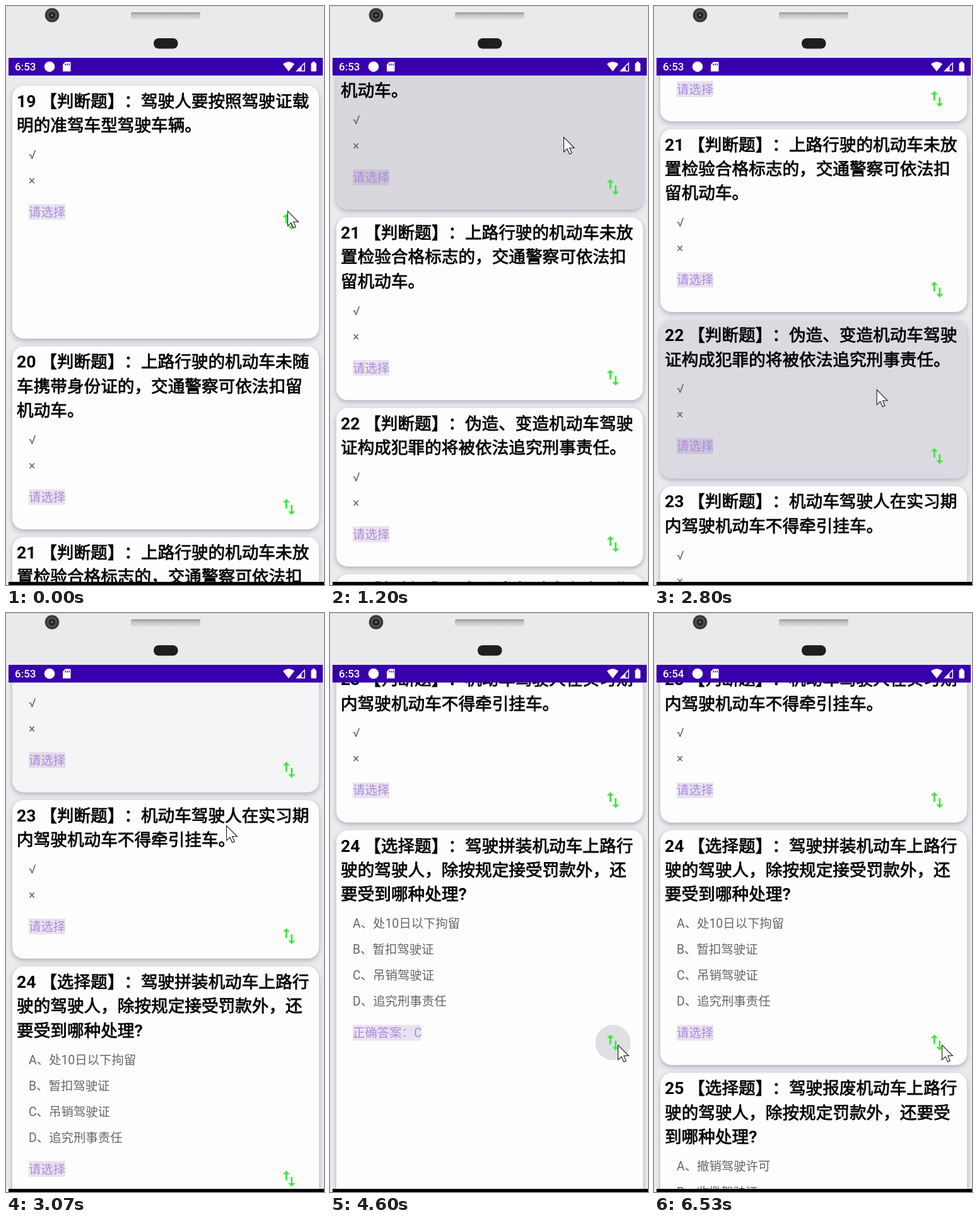
Write an HTML page with a canvas that moves like this. It is 504 px wide and 916 px high and loops after 8000 ms.

```html
<!DOCTYPE html>
<html lang="zh-CN">
<head>
<meta charset="utf-8">
<title>驾驶题库</title>
<style>
html, body { margin: 0; width: 100%; height: 100%; overflow: hidden; background: #e8eaec; }
canvas { display: block; width: 504px; height: 916px; }
</style>
</head>
<body>
<canvas id="stage"></canvas>
<script>
const W = 504, H = 916, LOOP = 8000, FPS = 15;
const BAR = 82, TOP = 110, FLOOR = 911;
const CJK = '"Noto Sans CJK SC", "Noto Sans CJK", sans-serif';
const LATIN = 'Roboto, sans-serif';
const TITLE = 26.63, BODY = 19.4;
const SHELL = '#e8eaec', PURPLE = '#3700ac';

const canvas = document.getElementById('stage');
const ctx = canvas.getContext('2d');
const dpr = window.devicePixelRatio || 1;
canvas.width = W * dpr;
canvas.height = H * dpr;

const yesNo = ['√', '×'];
const cards = [
  { title: ['19 【判断题】：驾驶人要按照驾驶证载', '明的准驾车型驾驶车辆。'], options: yesNo },
  { title: ['20 【判断题】：上路行驶的机动车未随', '车携带身份证的，交通警察可依法扣留', '机动车。'], options: yesNo },
  { title: ['21 【判断题】：上路行驶的机动车未放', '置检验合格标志的，交通警察可依法扣', '留机动车。'], options: yesNo },
  { title: ['22 【判断题】：伪造、变造机动车驾驶', '证构成犯罪的将被依法追究刑事责任。'], options: yesNo },
  { title: ['23 【判断题】：机动车驾驶人在实习期', '内驾驶机动车不得牵引挂车。'], options: yesNo },
  { title: ['24 【选择题】：驾驶拼装机动车上路行', '驶的驾驶人，除按规定接受罚款外，还', '要受到哪种处理?'],
    options: ['A、处10日以下拘留', 'B、暂扣驾驶证', 'C、吊销驾驶证', 'D、追究刑事责任'] },
  { title: ['25 【选择题】：驾驶报废机动车上路行', '驶的驾驶人，除按规定罚款外，还要受', '到哪种处理?'],
    options: ['A、撤销驾驶许可', 'B、收缴驾驶证'] }
];

const clamp = p => Math.min(1, Math.max(0, p));
const span = (t, a, b) => clamp((t - a) / (b - a));
const linear = p => p;
const smooth = p => p * p * (3 - 2 * p);
const rush = p => p * p;
const out = p => 1 - (1 - p) * (1 - p);

// Each key is [time, values, easing towards this key].
function track(keys, t) {
  let i = 0;
  while (i < keys.length - 1 && t >= keys[i + 1][0]) i++;
  const [t0, a] = keys[i];
  if (i === keys.length - 1) return a;
  const [t1, b, ease = linear] = keys[i + 1];
  const p = ease(span(t, t0, t1));
  return a.map((v, k) => v + (b[k] - v) * p);
}

const pointer = [
  [0, [446, 324]], [260, [446, 324]], [530, [385, 566], smooth],
  [900, [385, 566]], [1170, [370, 207], smooth],
  [2080, [370, 207]], [2133, [379, 532]], [2200, [381, 625]], [2330, [354, 705], out],
  [2640, [354, 705]], [2950, [349, 336], rush],
  [3590, [349, 336]], [4130, [456, 683], smooth]
];
const pressA = [[900, [0]], [1060, [0.7]], [1200, [0.9]], [1500, [0]]];
const pressB = [[2640, [0]], [2800, [0.8]], [2930, [0.8]], [3067, [0.22]], [3200, [0]]];

function scrollAt(t) {
  const flingA = s => 411.5 - 55 * Math.exp((1200 - s) / 90);
  const flingB = s => 1175 - 215 * Math.exp((3067 - s) / 160);
  if (t < 900) return 0;
  if (t < 1170) return flingA(1170) * smooth(span(t, 900, 1170));
  if (t < 1530) return flingA(t);
  if (t < 2640) return 411.5;
  if (t < 2950) return 411.5 + (flingB(2950) - 411.5) * rush(span(t, 2640, 2950));
  return t < 4130 ? flingB(t) : 1175;
}

function extraAt(i, t) {
  if (i === 0) return 149.5 * (1 - smooth(span(t, 50, 430)));
  if (i === 5) return 220 * (out(span(t, 4440, 4630)) - smooth(span(t, 6080, 6460)));
  return 0;
}

function pressAt(i, t) {
  return i === 1 ? track(pressA, t)[0] : i === 3 ? track(pressB, t)[0] : 0;
}

function rippleAt(t) {
  for (const start of [4440, 5770]) {
    if (t > start && t < start + 500) {
      return { r: 28 * out(span(t, start, start + 140)), a: 1 - span(t, start + 190, start + 500) };
    }
  }
  return null;
}

function box(x, y, w, h, r, fill) {
  ctx.fillStyle = fill;
  ctx.beginPath();
  ctx.roundRect(x, y, w, h, r);
  ctx.fill();
}

function disc(x, y, r, fill) {
  ctx.fillStyle = fill;
  ctx.beginPath();
  ctx.arc(x, y, r, 0, Math.PI * 2);
  ctx.fill();
}

function poly(points) {
  ctx.beginPath();
  points.forEach(([x, y]) => ctx.lineTo(x, y));
  ctx.closePath();
}

// Latin runs use Roboto. Chinese is set one full-width glyph at a time, so
// adjoining punctuation is not squeezed; bold is thickened with an outline.
function text(str, x, mid, size, color, bold) {
  ctx.fillStyle = ctx.strokeStyle = color;
  const y = mid + size * 0.365;
  for (const run of str.match(/[\x00-\x7f√×]+|[^\x00-\x7f√×]/g)) {
    const latin = /[\x00-\x7f√×]/.test(run);
    ctx.font = `${latin && bold ? 700 : 400} ${size}px ${latin ? LATIN : CJK}`;
    ctx.fillText(run, x, y);
    if (bold && !latin) {
      ctx.lineWidth = size / 32;
      ctx.lineJoin = 'round';
      ctx.strokeText(run, x, y);
    }
    x += latin ? ctx.measureText(run).width : size;
  }
}

const swap = new Path2D('M16 17V10h-2v7h-3l4 4 4-4zM9 3L5 7h3v7h2V7h3z');
function swapIcon(x, y) {
  ctx.save();
  ctx.translate(x, y);
  ctx.scale(1.4, 1.4);
  ctx.translate(-12, -12);
  ctx.fillStyle = '#3fe83f';
  ctx.fill(swap);
  ctx.restore();
}

function card(i, y, t) {
  const { title, options } = cards[i];
  const first = 32 + 38.4 * title.length;
  const pick = first + 41 * options.length + 9;
  const height = pick + 51 + extraAt(i, t);
  if (y < FLOOR && y + height > TOP - 20) {
    ctx.save();
    ctx.shadowColor = 'rgba(60, 60, 75, .36)';
    ctx.shadowBlur = 8 * dpr;
    ctx.shadowOffsetY = 3 * dpr;
    box(10, y, 486, height, 18, '#fdfdfd');
    ctx.restore();

    ctx.globalAlpha = pressAt(i, t);
    box(10, y, 486, height, 18, '#d4d3da');
    ctx.globalAlpha = 1;

    title.forEach((line, k) => text(line, 17, y + 24 + 38.4 * k, TITLE, '#050505', true));
    options.forEach((line, k) => text(line, 36, y + first + 41 * k, BODY, '#666'));

    const open = i === 5 && t > 4440 && t < 5850;
    box(36, y + pick - 12.5, open ? 108 : 58, 25, 0, 'rgba(110, 75, 160, .14)');
    text(open ? '正确答案：C' : '请选择', 36, y + pick, BODY, '#ad8bdd');

    const ripple = i === 5 && rippleAt(t);
    if (ripple) {
      ctx.globalAlpha = ripple.a;
      disc(448.5, y + pick + 15.5, ripple.r, '#dfdee2');
      ctx.globalAlpha = 1;
    }
    swapIcon(448.5, y + pick + 15.5);
  }
  return y + height + 12.4;
}

function statusBar(t) {
  box(4, BAR, 498, TOP - BAR, 0, PURPLE);
  ctx.fillStyle = '#fff';
  ctx.font = `500 17px ${LATIN}`;
  ctx.fillText(t < 6130 ? '6:53' : '6:54', 14, 102);
  disc(69, 96, 8.3, '#fff');

  poly([[94, 88.5], [102.5, 88.5], [102.5, 103.5], [90, 103.5], [90, 92.5]]);
  ctx.fill();
  ctx.fillStyle = PURPLE;
  for (const x of [93.5, 96.5, 99.5]) ctx.fillRect(x, 91, 1.3, 3.2);

  ctx.fillStyle = '#fff';
  ctx.beginPath();
  ctx.moveTo(448, 103.5);
  ctx.lineTo(439, 92);
  ctx.quadraticCurveTo(448, 84.5, 457, 92);
  ctx.closePath();
  ctx.fill();

  poly([[459, 103.5], [474, 88.5], [474, 103.5]]);
  ctx.fill();
  ctx.fillStyle = PURPLE;
  poly([[468.5, 96], [472.6, 92], [472.6, 102], [468.5, 102]]);
  ctx.fill();

  box(483.5, 90, 8.5, 13.5, 1.5, '#fff');
  box(485.7, 88, 4, 3, 0, '#fff');
}

function bezel() {
  box(0, 0, W, BAR, 0, SHELL);
  box(0, 0, 4, H, 0, SHELL);
  box(502, 0, 2, H, 0, SHELL);
  box(0, 0, W, 1, 0, '#d2d4d6');

  disc(73, 14.5, 11.3, '#3a3a3a');
  disc(73, 14.5, 7.5, '#5a5a5a');
  disc(73, 14.5, 5.5, '#222');
  disc(73, 14.5, 2, '#686868');

  const slot = ctx.createLinearGradient(0, 10, 0, 21);
  slot.addColorStop(0, '#8d8e90');
  slot.addColorStop(0.35, '#c0c2c4');
  slot.addColorStop(1, '#dcdee0');
  box(198, 10, 110, 11, 3, slot);
  box(234, 51, 38.5, 16.5, 8, '#1e1e1e');
  box(4, FLOOR, 500, H - FLOOR, 0, '#020202');
}

function arrow([x, y]) {
  const shape = [[0, 0], [0, 16.5], [3.8, 13], [6.4, 18.8], [9, 17.6], [6.5, 12], [11.9, 12]];
  poly(shape.map(([a, b]) => [x + 0.5 + a * 1.42, y + 0.5 + b * 1.42]));
  ctx.fillStyle = '#fff';
  ctx.fill();
  ctx.strokeStyle = '#1c1c1c';
  ctx.lineWidth = 1.1;
  ctx.lineJoin = 'miter';
  ctx.stroke();
}

function draw(t) {
  ctx.setTransform(dpr, 0, 0, dpr, 0, 0);
  box(0, 0, W, H, 0, '#ebebf0');
  ctx.save();
  ctx.beginPath();
  ctx.rect(4, TOP, 498, FLOOR - TOP);
  ctx.clip();
  let y = 126 - scrollAt(t);
  cards.forEach((_, i) => { y = card(i, y, t); });
  ctx.restore();
  bezel();
  statusBar(t);
  arrow(track(pointer, t));
}

const start = performance.now();
function tick() {
  const t = (performance.now() - start) % LOOP;
  draw(Math.floor((t + 4) * FPS / 1000) * 1000 / FPS % LOOP);
  requestAnimationFrame(tick);
}
tick();
</script>
</body>
</html>
```
